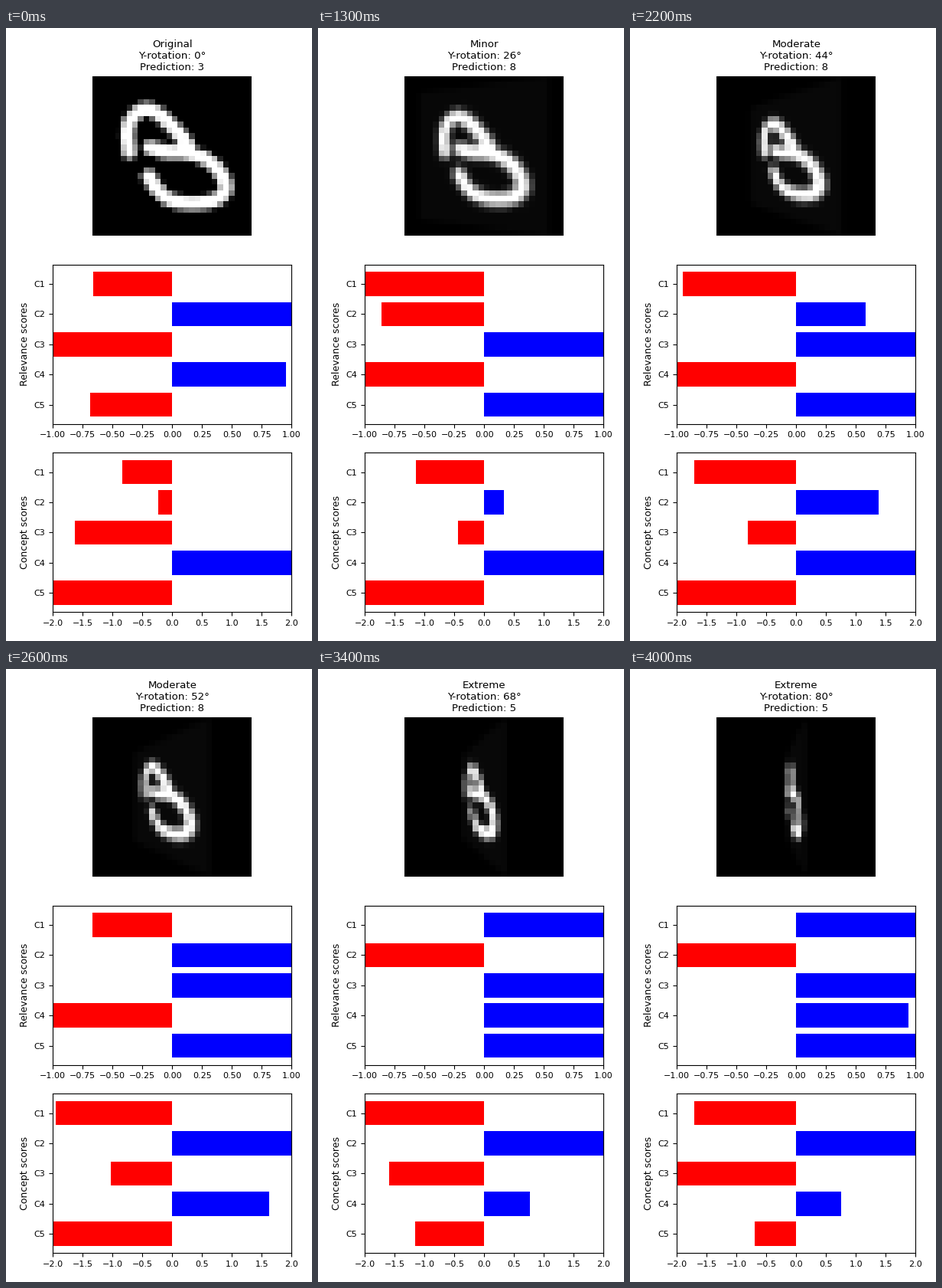
A matplotlib script for the animation above (4100 ms loop, 400x800 px).

```python
import numpy as np
import matplotlib.pyplot as plt
from matplotlib.animation import FuncAnimation

W, H, DPI = 400, 800, 100
N = 28                      # digit grid
SUB = 4                     # samples per cell side
FRAMES, STEP = 41, 2        # two degrees per frame
MAX_ANGLE = (FRAMES - 1) * STEP
FULL = 1.5                  # bar running past the chart's edge

UPPER = [(6.5, 13.3), (6.2, 9.8), (7, 7.3), (8.9, 5.9), (10.7, 6.1),
         (13.1, 7.9), (16.7, 12), (15.6, 13.2), (13, 13.2), (10.1, 12.5)]
LOWER = [(10.1, 12.5), (13, 13.3), (16, 13.4), (19.5, 14.3), (22, 16.3), (23.4, 18.8),
         (23, 20.7), (21, 21.9), (17.5, 22.3), (14, 21.8), (11.8, 20.3), (9.9, 17.6)]


def spline(points, steps=20):
    """Catmull-Rom curve through the points."""
    p = np.array(points, float)
    p = np.vstack([2 * p[0] - p[1], p, 2 * p[-1] - p[-2]])
    t = np.linspace(0, 1, steps)[:, None]
    return np.vstack([
        .5 * (2 * b + (c - a) * t + (2 * a - 5 * b + 4 * c - d) * t**2
              + (3 * b - a - 3 * c + d) * t**3)
        for a, b, c, d in zip(p, p[1:], p[2:], p[3:])])


def make_digit():
    ink = np.vstack([spline(UPPER), spline(LOWER)])
    y, x = np.mgrid[:N, :N] + .5
    dist = np.hypot(x[..., None] - ink[:, 0], y[..., None] - ink[:, 1]).min(axis=-1)
    return np.clip((1.22 - dist) / 1.05 + .5, 0, 1)


def sample(img, x, y):
    """Bilinear lookup with black outside the image."""
    pad = np.pad(img, 2)
    x, y = np.clip(x + 1.5, 0, N + 2.99), np.clip(y + 1.5, 0, N + 2.99)
    i, j = x.astype(int), y.astype(int)
    fx, fy = x - i, y - j
    top = pad[j, i] * (1 - fx) + pad[j, i + 1] * fx
    low = pad[j + 1, i] * (1 - fx) + pad[j + 1, i + 1] * fx
    return top * (1 - fy) + low * fy


def rotate(img, angle):
    """Turn the card about its vertical axis, right edge nearest."""
    if angle == 0:
        return img
    far = .5 + .5 * np.exp(-(angle / 35)**2)
    half = np.cos(np.radians(angle)) * (1 + far) / 2
    k = 1 / far
    spread = ((np.arange(SUB) + .5) / SUB - .5) * 1.2
    line = (np.arange(N)[:, None] + .5 + spread).ravel() / (N / 2) - 1
    x, y = np.meshgrid(line, line)
    u = (x * (1 + k) - half * (1 - k)) / (half * (1 + k) - x * (1 - k))
    v = y * ((1 + u) + (1 - u) * k) / 2
    u = np.where(np.abs(u) > 1.2, 9, u)
    out = sample(np.maximum(img, .027), (u + 1) * N / 2, (v + 1) * N / 2)
    out = out.reshape(N, SUB, N, SUB).mean(axis=(1, 3))
    return np.clip(1.15 * out / out.max(), 0, 1)


def predict(angle):
    return 3 if angle < 26 else 8 if angle < 58 else 5


def relevance(a):
    """Scores drift linearly and jump when the predicted class changes."""
    left = MAX_ANGLE - a
    return {
        3: (-.66 + .13 * a, 1.05 - .004 * a, -FULL, .95 + .01 * a, -.69 - .03 * a),
        8: (-.67 + .035 * (a - 52), -.06 + .08 * (a - 36), FULL, -FULL, FULL),
        5: (FULL, -FULL, FULL, .94 + .02 * left, FULL),
    }[predict(a)]


def concept(a):
    return (-.82 - 1.25 * np.exp(-((a - 62) / 31)**2),
            -.23 + .00083 * a**2,
            -.25 - .00029 * a**2 - 1.38 * np.exp(-(a / 6)**2),
            .75 + 1.4 / (1 + np.exp((a - 53.5) / 3)),
            -.7 - .0185 * (MAX_ANGLE - a)**1.29)


def caption(angle):
    level = ("Original" if angle == 0 else "Minor" if angle <= 30
             else "Moderate" if angle <= 60 else "Extreme")
    return f"{level}\nY-rotation: {angle}°\nPrediction: {predict(angle)}"


fig = plt.figure(figsize=(W / DPI, H / DPI), dpi=DPI, facecolor="white")


def add_axes(left, bottom, width, height):
    return fig.add_axes([left / W, bottom / H, width / W, height / H])


def bar_chart(bottom, label, limit):
    ax = add_axes(61.3, bottom, 312, 208)
    bars = ax.barh([f"C{n}" for n in range(1, 6)], [limit] * 5)
    ax.set_xlim(-limit, limit)
    ax.set_xticks(np.linspace(-limit, limit, 9))
    ax.set_ylim(4.64, -.64)
    ax.tick_params(labelsize=8)
    ax.set_ylabel(label, fontsize=9)
    return bars


digit = make_digit()
card = add_axes(113.3, 529, 208, 208)
card.axis("off")
picture = card.imshow(digit, cmap="gray", vmin=0, vmax=1, interpolation="nearest")
title = card.set_title(caption(0), fontsize=9.6)
charts = [(bar_chart(283.25, "Relevance scores", 1), relevance),
          (bar_chart(37.65, "Concept scores", 2), concept)]


def update(i):
    angle = i * STEP
    picture.set_data(rotate(digit, angle))
    title.set_text(caption(angle))
    for bars, scores in charts:
        for bar, value in zip(bars, scores(angle)):
            bar.set_width(value)
            bar.set_facecolor("red" if value < 0 else "blue")
    return []


anim = FuncAnimation(fig, update, frames=FRAMES, interval=100, repeat=True)
plt.show()
```
